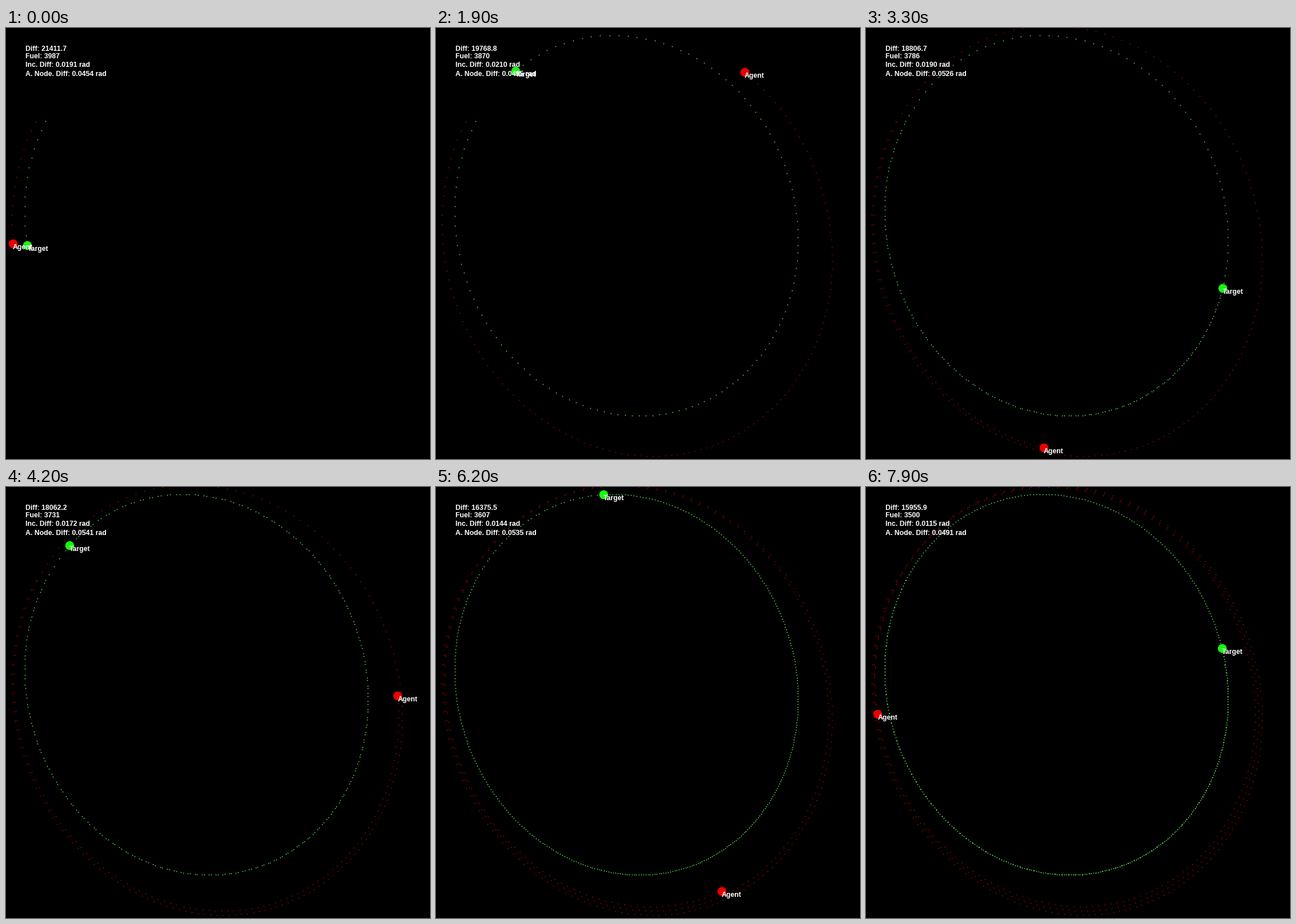
These frames come from a looping animation (742x754 px, 8000 ms). A matplotlib script:

```python
import numpy as np
import matplotlib.pyplot as plt
from matplotlib.animation import FuncAnimation

W, H, DPI = 742, 754, 100
PX = 72 / DPI
FRAMES, INTERVAL = 80, 100
START_FUEL, LAST_STEP = 4000, 500


def drift(frame, start, end, *waves):
    """Straight run from start to end with a few sine waves on top."""
    p = frame / (FRAMES - 1)
    ripple = sum(w * np.sin(k * np.pi * p) for k, w in enumerate(waves, 1))
    return start + (end - start) * p + ripple


def eccentric(mean, a, b):
    """Solve Kepler's equation u - a sin u + b (1 - cos u) = mean."""
    u = mean.copy()
    for _ in range(12):
        f = u - a * np.sin(u) + b * (1 - np.cos(u)) - mean
        u -= f / (1 - a * np.cos(u) + b * np.sin(u))
    return u


def orbit(u, start, skew, left, right, top, bottom):
    """Skewed ellipse that touches the given bounds, run from angle start."""
    t = start - u
    x = (left + right) / 2 + (right - left) / 2 * np.cos(t)
    y = (top + bottom) / 2 + (bottom - top) / 2 * np.sin(t + skew)
    return x, y


n = np.arange(LAST_STEP + 1.0)
target_path = orbit(eccentric(0.045969 * n, 0.1576, 0.0667),
                    3.642, 0.078, 32.5, 633.5, 12.5, 678.5)
# The agent burns fuel, so its orbit shrinks and speeds up
agent_path = orbit(eccentric(0.0377 * n + 2.3e-6 * n**2, 0.216 - 5e-5 * n, 0.0975),
                   3.6396, 0.085,
                   9.8 + 0.0255 * n - 2.9e-5 * n**2, 697 - 0.038 * n,
                   -5.8 + 0.013 * n, 751.5 - 0.046 * n)

fig = plt.figure(figsize=(W / DPI, H / DPI), dpi=DPI, facecolor="black")
ax = fig.add_axes([0, 0, 1, 1])
ax.set_xlim(0, W)
ax.set_ylim(H, 0)
ax.axis("off")


def label(x, y, text=""):
    return ax.text(x, y, text, color="white", family="Liberation Sans",
                   weight="bold", size=12.3 * PX, va="baseline", zorder=4)


class Craft:
    def __init__(self, name, path, color, dot_color):
        self.x, self.y = path
        self.trail, = ax.plot([], [], "s", ms=1.5 * PX, mew=0, color=dot_color)
        self.body, = ax.plot([], [], "o", ms=15.5 * PX, mew=0, color=color, zorder=3)
        self.tag = label(0, 0, name)

    def move(self, step):
        x, y = self.x[step], self.y[step]
        self.trail.set_data(self.x[:step], self.y[:step])
        self.body.set_data([x], [y])
        self.tag.set_position((x, y + 10))


agent = Craft("Agent", agent_path, "#ea0000", "#c80000")
target = Craft("Target", target_path, "#14fa0a", "#64ff64")
lines = [label(34.5, y) for y in (40, 53, 68, 83.5)]


def update(frame):
    step = round(drift(frame, 13, LAST_STEP, -2.4, 1.25, 0.4, 0.4))
    agent.move(step)
    target.move(step)

    diff = drift(frame, 21411.7, 15955.9, -590, 220, -190)
    incl = drift(frame, 0.0191, 0.0115, 0.0030, 0.0012, 0.0006)
    node = drift(frame, 0.0454, 0.0491, 0.0065, -0.0012)
    lines[0].set_text(f"Diff: {diff:.1f}")
    lines[1].set_text(f"Fuel: {START_FUEL - step}")
    lines[2].set_text(f"Inc. Diff: {incl:.4f} rad")
    lines[3].set_text(f"A. Node. Diff: {node:.4f} rad")


anim = FuncAnimation(fig, update, frames=FRAMES, init_func=lambda: update(0),
                     interval=INTERVAL, repeat=True, repeat_delay=0)
plt.show()
```
